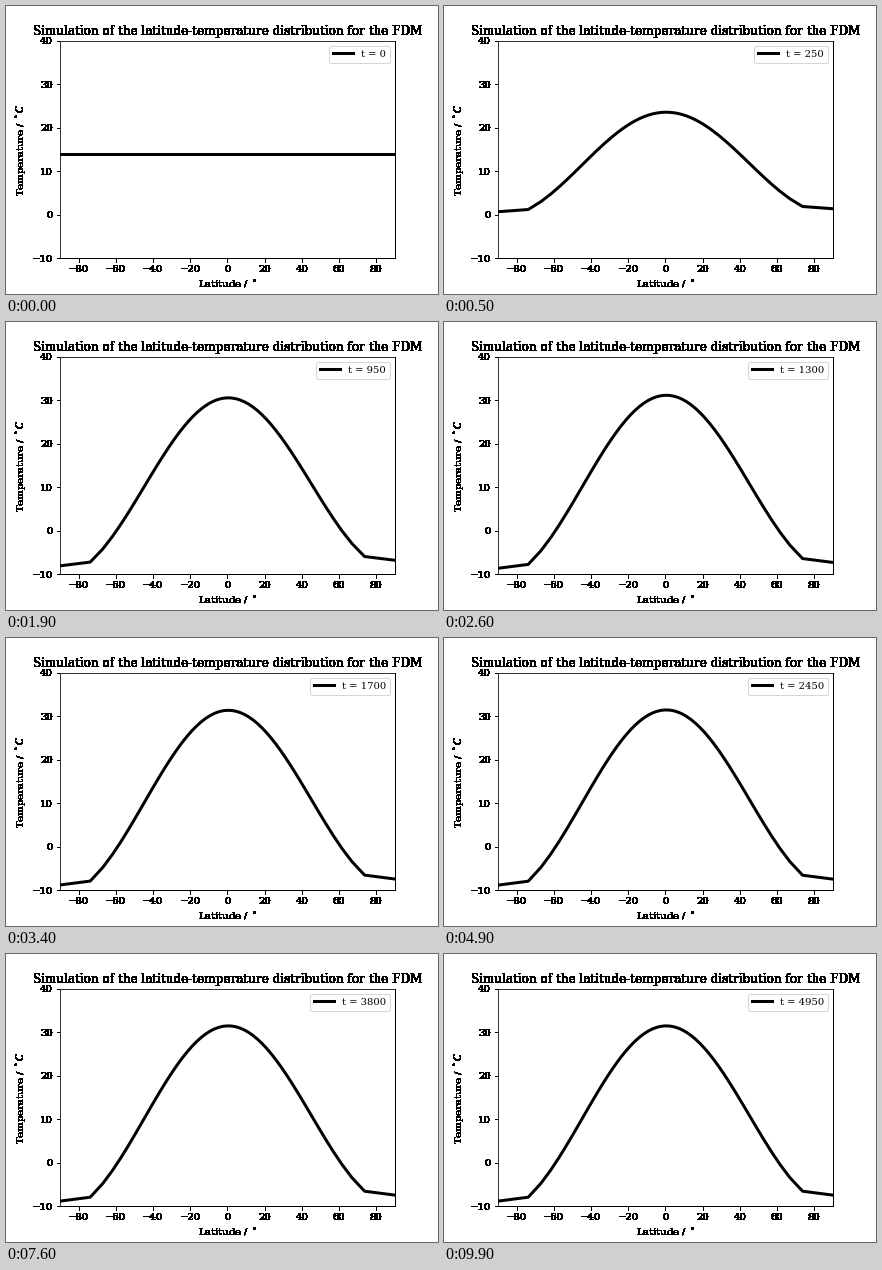
Animation, 432 px wide and 288 px high, one loop 10 s. Source, as a matplotlib script:

```python
import numpy as np
import matplotlib.pyplot as plt
from matplotlib.animation import FuncAnimation

FRAMES, INTERVAL, STEP = 100, 100, 50

plt.rcParams.update({"font.family": "DejaVu Serif", "font.size": 10})

x = np.linspace(-1, 1, 51)  # grid is uniform in sin(latitude)
lat = np.degrees(np.arcsin(x))
p2 = (3 * x**2 - 1) / 2


def relax(t, tau):
    return 1 - np.exp(-t / tau)


def temperature(t):
    """Relaxation of the lowest Legendre modes from a uniform 14 degrees."""
    mean = 14 + 3.42 * relax(t, 412)
    temp = mean + 0.72 * relax(t, 360) * x - 28 * relax(t, 297) * p2
    drop = 0.9 * relax(t, 297)
    temp[0] = temp[1] - drop
    temp[-1] = temp[-2] - drop
    return temp


def drop_alpha(img, dpi):
    """Make every touched pixel opaque, giving hard-edged text and ticks."""
    out = np.round(img * 255).astype(np.uint8)
    out[..., 3] = np.where(out[..., 3] > 0, 255, 0)
    return out, 0, 0


fig = plt.figure(figsize=(6, 4), dpi=72, facecolor="white")
ax = fig.add_axes([0.125, 0.125, 0.775, 0.755])
ax.set_agg_filter(drop_alpha)
ax.set_xlim(-90, 90)
ax.set_ylim(-10, 40)
ax.set_xticks(range(-80, 81, 20))
ax.set_yticks(range(-10, 41, 10))
ax.set_title("Simulation of the latitude-temperature distribution for the FDM")
ax.set_xlabel(r"Latitude / $^\circ$")
ax.set_ylabel(r"Temperature / $^\circ C$")
line, = ax.plot(lat, temperature(0), color="black", lw=3)


def update(i):
    t = i * STEP
    line.set_ydata(temperature(t))
    line.set_label(f"t = {t}")
    ax.legend(loc="upper right")
    return line,


anim = FuncAnimation(fig, update, frames=FRAMES, interval=INTERVAL,
                     repeat=True, repeat_delay=0, blit=False)
plt.show()
```
